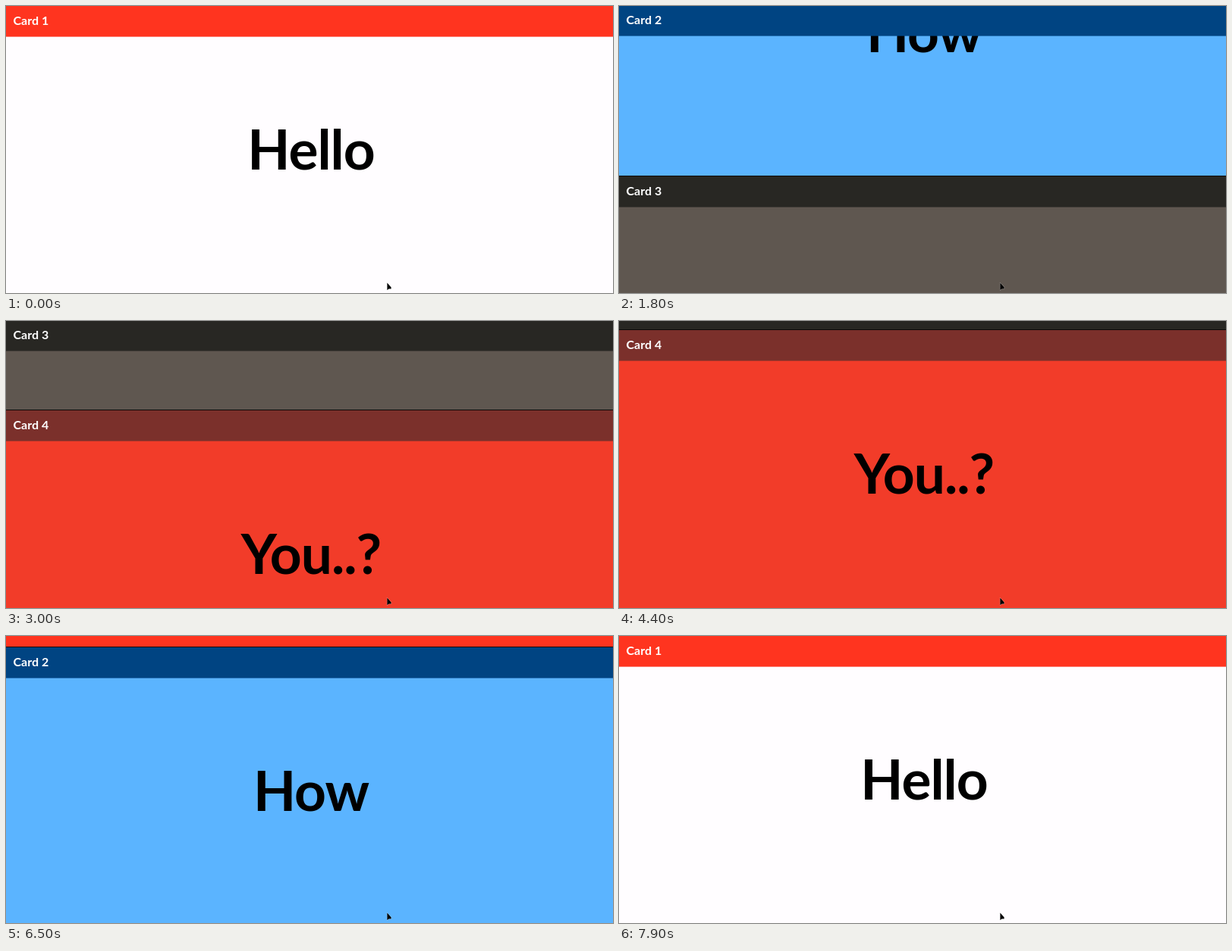
An HTML page for the animation above (8 s loop, 800x379 px).

```html
<!DOCTYPE html>
<html lang="en">
<head>
<meta charset="utf-8">
<title>Stacked cards</title>
<style>
  html, body { margin: 0; width: 100%; height: 100%; overflow: hidden; background: #fffdff; }
  svg { display: block; width: 800px; height: 379px; }
  text { font-family: Lato, "Open Sans", sans-serif; font-weight: 700; }
  .word { font-size: 73px; letter-spacing: -1px; text-anchor: middle; }
  .label { font-size: 16px; fill: #fff; }
</style>
</head>
<body>
<svg id="stage" viewBox="0 0 800 379">
  <g id="cards"></g>
  <path d="M502.4 365.6V375.3L504.5 373.6H507.6V371.4Z"
        fill="#000" stroke="#fff" stroke-opacity=".55" stroke-width=".8" paint-order="stroke"/>
</svg>
<script>
const LOOP = 8000, STEP = 100;
const PITCH = 380, HEAD = 40.6, LINE = 1, STICK = -1;

const cards = [
  { word: "Hello", head: "#ff341f", body: "#fffdff" },
  { word: "How", head: "#004482", body: "#5bb4ff" },
  { word: "Are", head: "#282723", body: "#5f5750" },
  { word: "You..?", head: "#7b302b", body: "#f23c29" }
];

// [time, scroll offset]: down through all cards, pause, back up
const path = [
  [0, 0], [200, 0], [300, 8], [600, 78], [1800, 535], [3000, 1022],
  [3200, 1097], [3400, 1135], [3500, 1140], [4300, 1140], [4400, 1128],
  [4700, 1051], [5600, 722.6], [6500, 365], [7300, 57], [7500, 14],
  [7700, 0], [LOOP, 0]
];

function add(parent, name, attrs, text) {
  const el = document.createElementNS("http://www.w3.org/2000/svg", name);
  for (const key in attrs) el.setAttribute(key, attrs[key]);
  if (text) el.textContent = text;
  parent.append(el);
  return el;
}

const root = document.getElementById("cards");
cards.forEach((card, i) => {
  const g = card.el = add(root, "g", {});
  if (i) add(g, "rect", { y: -LINE, width: 800, height: LINE + 1, fill: "#0b0908" });
  add(g, "rect", { width: 800, height: PITCH - LINE, fill: card.body });
  add(g, "text", { class: "word", x: 402, y: 216 }, card.word);
  card.bar = add(g, "g", {});
  add(card.bar, "rect", { width: 800, height: HEAD, fill: card.head });
  add(card.bar, "text", { class: "label", x: 9.5, y: 25 }, "Card " + (i + 1));
});

const secant = i => (path[i + 1][1] - path[i][1]) / (path[i + 1][0] - path[i][0]);

// Harmonic mean keeps the curve monotone between points
function slope(i) {
  if (i === 0 || i === path.length - 1) return 0;
  const a = secant(i - 1), b = secant(i);
  return a * b > 0 ? 2 * a * b / (a + b) : 0;
}

function scrollAt(t) {
  let i = 0;
  while (i < path.length - 2 && t >= path[i + 1][0]) i++;
  const [t0, y0] = path[i], [t1, y1] = path[i + 1];
  const d = t1 - t0, u = (t - t0) / d, v = 1 - u;
  return v * v * (1 + 2 * u) * y0 + u * u * (3 - 2 * u) * y1
    + d * u * v * (v * slope(i) - u * slope(i + 1));
}

function draw(t) {
  const scroll = scrollAt(t);
  cards.forEach(({ el, bar }, i) => {
    const top = i * PITCH - scroll;
    const stuck = Math.min(Math.max(0, STICK - top), PITCH - LINE - HEAD);
    el.setAttribute("transform", `translate(0 ${top.toFixed(2)})`);
    bar.setAttribute("transform", `translate(0 ${stuck.toFixed(2)})`);
  });
}

function tick(now) {
  draw(Math.floor(now % LOOP / STEP) * STEP);
  requestAnimationFrame(tick);
}

draw(0);
requestAnimationFrame(tick);
</script>
</body>
</html>
```
